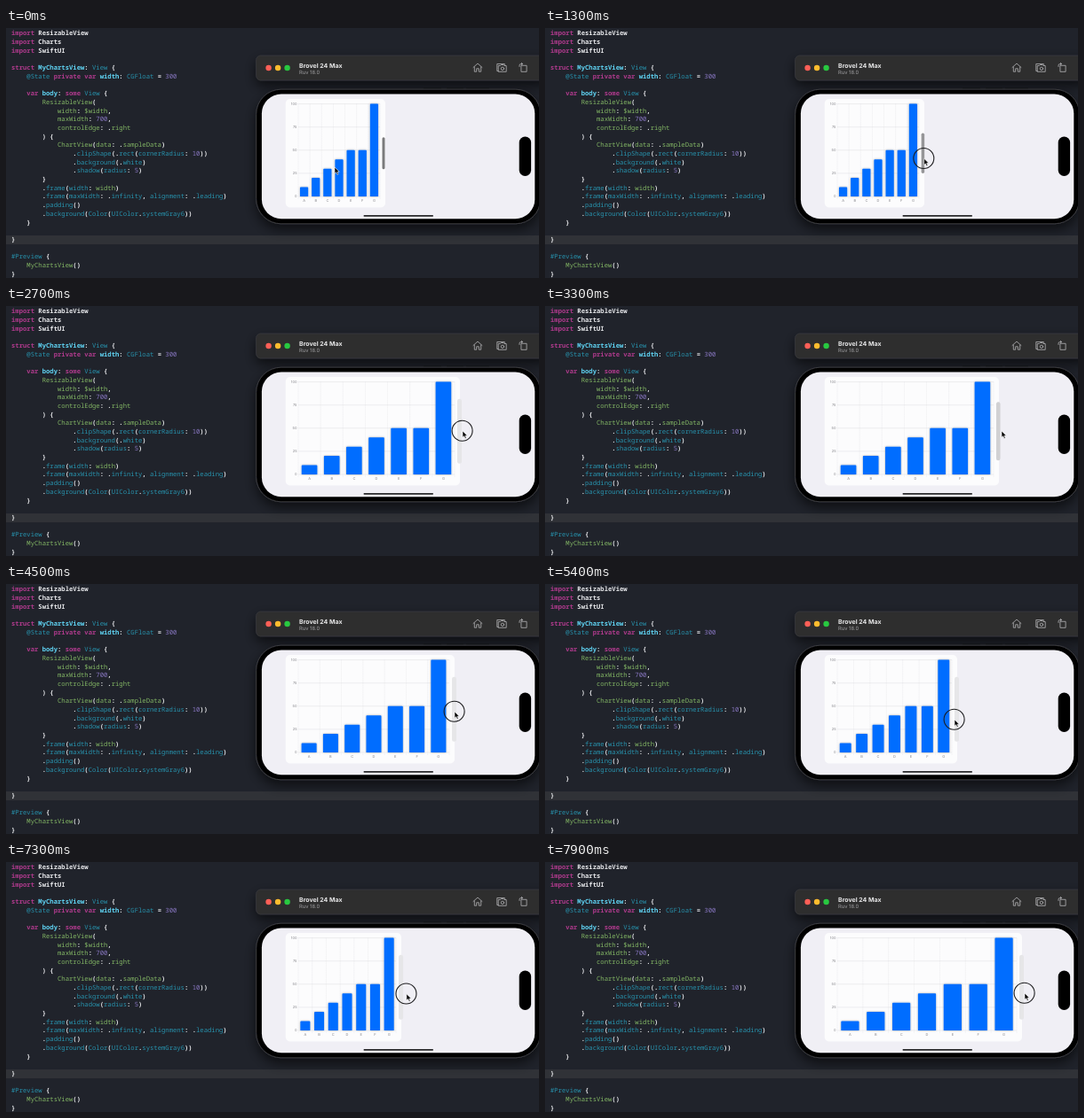
An HTML page that plays this animation: 600x282 px, repeating every 8 s.

```html
<!DOCTYPE html>
<html lang="en">
<head>
<meta charset="utf-8">
<title>Resizable chart</title>
<style>
  html, body { margin: 0; width: 100%; height: 100%; overflow: hidden; background: #20232b; }
  #stage { position: relative; width: 600px; height: 282px; overflow: hidden; }
  .line { position: absolute; left: 0; top: 234px; width: 600px; height: 9.5px; background: #303237; }
  pre {
    position: absolute; left: 6px; top: 2.4px; margin: 0; color: #e6e7ea;
    font: 600 7.22px/9.68px "Noto Sans Mono", "DejaVu Sans Mono", monospace;
    text-rendering: geometricPrecision;
  }
  .k { color: #ad3a8b; }
  .g { color: #83b765; font-weight: 500; }
  .c { color: #2793ae; font-weight: 500; }
  .d { color: #5fd3f3; }
  .p { color: #8a78c4; font-weight: 500; }
  svg { position: absolute; left: 0; top: 0; text-rendering: geometricPrecision; }
  svg text { font-family: Inter, Roboto, sans-serif; }
  .axis text { font-size: 4px; fill: #85858a; }
  .grid { stroke: #dcdce0; stroke-width: .5; fill: none; }
  .icon { stroke: #b4b4b6; stroke-width: .8; fill: none; stroke-linejoin: round; stroke-linecap: round; }
</style>
</head>
<body>
<div id="stage">
<div class="line"></div>
<pre><span class="k">import</span> ResizableView
<span class="k">import</span> Charts
<span class="k">import</span> SwiftUI

<span class="k">struct</span> <span class="d">MyChartsView</span>: <span class="c">View</span> {
    <span class="c">@State</span> <span class="k">private var</span> <span class="d">width</span>: <span class="c">CGFloat</span> = <span class="p">300</span>

    <span class="k">var</span> <span class="d">body</span>: <span class="k">some</span> <span class="c">View</span> {
        <span class="g">ResizableView</span>(
            <span class="g">width</span>: <span class="g">$width</span>,
            <span class="g">maxWidth</span>: <span class="p">700</span>,
            <span class="g">controlEdge</span>: .<span class="g">right</span>
        ) {
            <span class="g">ChartView</span>(<span class="g">data</span>: .<span class="g">sampleData</span>)
                .<span class="c">clipShape</span>(.<span class="c">rect</span>(<span class="c">cornerRadius</span>: <span class="p">10</span>))
                .<span class="c">background</span>(.<span class="c">white</span>)
                .<span class="c">shadow</span>(<span class="c">radius</span>: <span class="p">5</span>)
        }
        .<span class="c">frame</span>(<span class="c">width</span>: <span class="g">width</span>)
        .<span class="c">frame</span>(<span class="c">maxWidth</span>: .<span class="c">infinity</span>, <span class="c">alignment</span>: .<span class="c">leading</span>)
        .<span class="c">padding</span>()
        .<span class="c">background</span>(<span class="c">Color</span>(<span class="c">UIColor</span>.<span class="c">systemGray6</span>))
    }

}

<span class="c">#Preview</span> {
    <span class="g">MyChartsView</span>()
}</pre>
<svg width="600" height="282" viewBox="0 0 600 282">
  <defs>
    <filter id="halo" x="-20%" y="-40%" width="140%" height="200%">
      <feDropShadow dx="0" dy="6" stdDeviation="7" flood-color="#000" flood-opacity=".6"/>
    </filter>
    <filter id="soft" filterUnits="userSpaceOnUse" x="300" y="70" width="300" height="145">
      <feDropShadow dx="0" dy="0" stdDeviation=".9" flood-color="#000" flood-opacity=".35"/>
    </filter>
  </defs>

  <!-- simulator toolbar -->
  <g filter="url(#halo)">
    <rect x="281.5" y="31" width="328" height="28" rx="5.5" fill="#2d2d2e" stroke="#424244" stroke-width=".5"/>
  </g>
  <circle cx="295.6" cy="45" r="3.2" fill="#fe5f57"/>
  <circle cx="306.1" cy="45" r="3.2" fill="#febc2e"/>
  <circle cx="316.6" cy="45" r="3.2" fill="#28c840"/>
  <text x="330" y="44.6" font-size="7" font-weight="700" fill="#e8e8e9">Brovel 24 Max</text>
  <text x="330" y="52.3" font-size="5.8" fill="#a2a2a5">Ruv 18.0</text>
  <g class="icon">
    <path d="M526 44.5l5-4.5 5 4.5M527.3 44v5.2h2.4v-3.4h2.6v3.4h2.4V44"/>
    <path d="M554 48.5h-1.2v-8h8.5v1.4M554.6 42.5h2l.8-1h2.6l.8 1h2.4v6.8h-8.6z"/>
    <circle cx="558.9" cy="45.8" r="1.7"/>
    <path d="M580.3 42.3h5.8v7h-5.8zM578 43.5v-1.2q0-1.8 1.8-1.8h1.6M580.3 39.3l1.3 1.2-1.3 1.2"/>
  </g>

  <!-- phone -->
  <path d="M470 68.3h20M496 68.3h19M518 68.3h26" stroke="#15161a" stroke-width="2"/>
  <g filter="url(#halo)">
    <rect x="281.7" y="69.2" width="320" height="151.6" rx="28" fill="#050506" stroke="#4c4d51" stroke-width=".7"/>
  </g>
  <rect x="287.9" y="74.5" width="307.4" height="140.7" rx="22" fill="#f0eff5"/>
  <rect x="577.7" y="122.6" width="13.4" height="44.4" rx="6.7" fill="#000"/>
  <rect x="402.5" y="211.1" width="78.5" height="1.6" rx=".8" fill="#2a2a2c"/>

  <rect id="card" x="314.8" y="80" height="122.4" rx="5" fill="#fcfcfd"/>
  <path id="rows" class="grid"/>
  <path id="cols" class="grid" stroke-dasharray="1 1"/>
  <path id="bars" fill="#066dff" filter="url(#soft)"/>
  <g id="values" class="axis" text-anchor="end"></g>
  <g id="letters" class="axis" text-anchor="middle"></g>
  <rect id="grip"/>
  <g id="pointer">
    <circle id="ring" cx="-.4" cy="-.3" r="11.5" fill="none" stroke="#1c1c1e" stroke-width="1.1"/>
    <path d="M0 0v7.2l1.7-1.5 1.2 2.7 1.3-.6-1.2-2.6h2.3z" fill="#000" stroke="#fff" stroke-width=".6" stroke-linejoin="round"/>
  </g>
</svg>
</div>
<script>
const LOOP = 8000, STEP = 100;
const LEFT = 329, TOP = 85.6, BASE = 190;
const DATA = [10, 20, 30, 40, 50, 50, 100];
const $ = id => document.getElementById(id);

// Each track lists [time, value] pairs.
const edge = [[0, 427], [1500, 427], [2100, 451], [2700, 511], [3700, 511],
  [4500, 505], [5400, 464], [5900, 423.4], [6750, 423.4], [7200, 436], [7900, 537]];
const pointerX = [[0, 370], [900, 426], [1400, 427], [2100, 457], [2700, 514], [3300, 514],
  [3600, 511], [4500, 505], [5400, 461], [5900, 421], [6300, 409.5], [6700, 422], [7200, 441], [7900, 540]];
const pointerY = [[0, 157], [900, 147], [2100, 148], [2700, 141], [3300, 141],
  [4500, 144], [5400, 153], [6300, 150], [7200, 149], [7900, 148]];
const hold = [[0, 0], [1200, 0], [1500, 1], [3200, 1], [3300, .81], [3500, 0], [3600, 0],
  [3800, 1], [5900, 1], [6200, 0], [6700, 0], [6950, 1], [7900, 1]];
const presses = [[1200, 3200], [3600, 5900], [6700, LOOP]];

// Smooth interpolation that never overshoots its keys.
function sample(keys, t) {
  const last = keys.length - 1;
  if (t >= keys[last][0]) return keys[last][1];
  const i = keys.findIndex(k => k[0] > t) - 1;
  const slope = n => n < 0 || n >= last ? 0 :
    (keys[n + 1][1] - keys[n][1]) / (keys[n + 1][0] - keys[n][0]);
  const tangent = n => {
    const a = slope(n - 1), b = slope(n);
    return a * b > 0 ? 2 * a * b / (a + b) : 0;
  };
  const [t0, v0] = keys[i], [t1, v1] = keys[i + 1];
  const d = t1 - t0, u = (t - t0) / d, w = 1 - u;
  return v0 * w * w * (1 + 2 * u) + v1 * u * u * (3 - 2 * u) +
    d * u * w * (tangent(i) * w - tangent(i + 1) * u);
}

function setAttrs(el, attrs) {
  for (const name in attrs) el.setAttribute(name, attrs[name]);
}

function label(parent, text, attrs) {
  const el = document.createElementNS("http://www.w3.org/2000/svg", "text");
  el.textContent = text;
  setAttrs(el, attrs);
  parent.append(el);
  return el;
}

const yOf = value => BASE - (BASE - TOP) * value / 100;
const ticks = [0, 25, 50, 75, 100];
ticks.forEach(v => label($("values"), v, { x: 327.5, y: yOf(v) + 1.4 }));
const letters = DATA.map((_, i) => label($("letters"), "ABCDEFG"[i], { y: 196 }));

function drawChart(right) {
  const end = right - 6, pitch = (end - LEFT) / DATA.length;
  const width = pitch * .7, round = .8;
  $("card").setAttribute("width", right - 314.8);
  $("rows").setAttribute("d", ticks.map(v => `M${LEFT} ${yOf(v)}H${end}`).join(""));
  let cols = "", bars = "";
  for (let i = 0; i <= DATA.length; i++) cols += `M${LEFT + i * pitch} ${TOP}V${BASE + 3}`;
  DATA.forEach((v, i) => {
    const mid = LEFT + (i + .5) * pitch;
    bars += `M${mid - width / 2} ${BASE}V${yOf(v) + round}q0-${round} ${round}-${round}` +
      `h${width - 2 * round}q${round} 0 ${round} ${round}V${BASE}z`;
    letters[i].setAttribute("x", mid);
  });
  $("cols").setAttribute("d", cols);
  $("bars").setAttribute("d", bars);
}

function drawGrip(right, h) {
  const width = 3 + 2 * h, height = 36 + 37 * h, shade = 122 + 108 * h;
  setAttrs($("grip"), {
    x: right - 2 + 1.5 * h - width / 2, y: 141.2 - height / 2,
    width, height, rx: width / 2, fill: `rgb(${shade},${shade},${shade + 2})`
  });
}

function draw(now) {
  const t = Math.floor(now % LOOP / STEP) * STEP;
  const right = sample(edge, t);
  drawChart(right);
  drawGrip(right, sample(hold, t));
  $("pointer").setAttribute("transform", `translate(${sample(pointerX, t)} ${sample(pointerY, t)})`);
  const pressed = presses.some(([from, to]) => t >= from && t < to);
  $("ring").setAttribute("visibility", pressed ? "visible" : "hidden");
  requestAnimationFrame(draw);
}
draw(performance.now());
</script>
</body>
</html>
```
